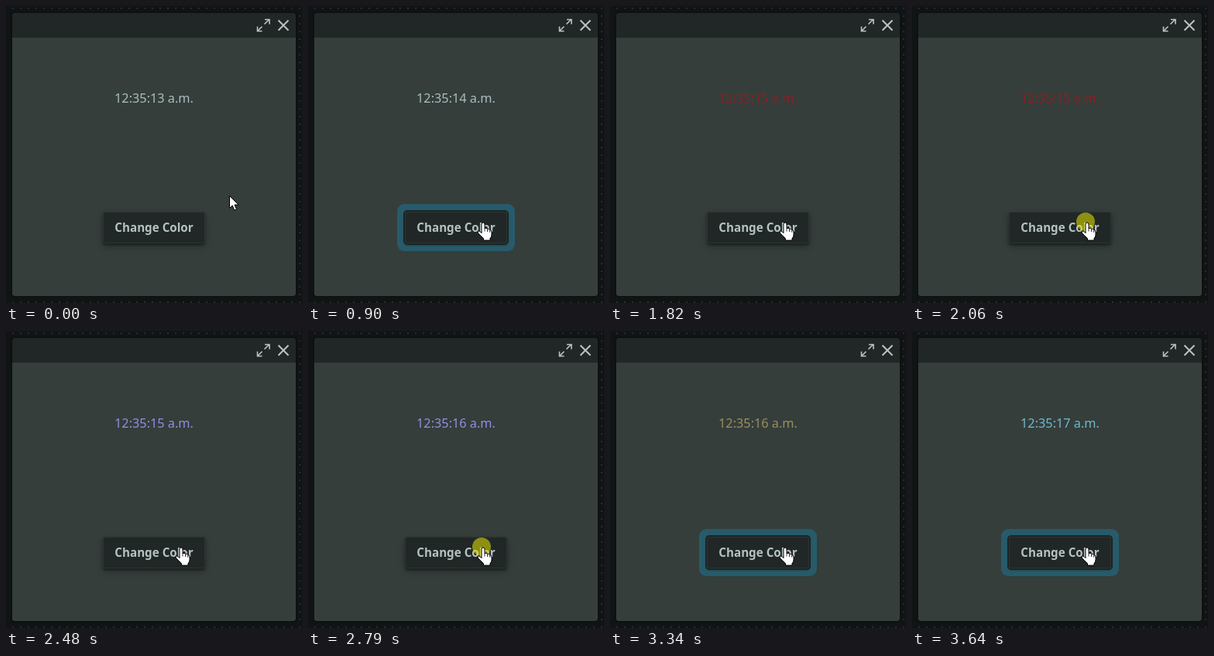
An HTML page that plays this animation: 382x384 px, repeating every 4010 ms.

```html
<!DOCTYPE html>
<html lang="en">
<head>
<meta charset="utf-8">
<title>Change Color</title>
<style>
  html, body { margin: 0; width: 100%; height: 100%; overflow: hidden; }
  body {
    position: relative;
    background: #101414 radial-gradient(circle, #272d2c 0.9px, transparent 1.3px) 4px -2px / 10px 10px;
    font-family: "Noto Sans", "Open Sans", sans-serif;
  }
  body > * { position: absolute; }
  #panel {
    left: 8px; top: 9px; width: 366px; height: 366px;
    border-radius: 4px;
    background: linear-gradient(#212726 32px, #353e3b 32px);
    box-shadow: 0 0 3px #0009;
  }
  #clock, #button { text-align: center; white-space: nowrap; }
  #clock { left: 8px; width: 366px; top: 108px; font-size: 16.3px; line-height: 22px; }
  #button {
    left: 125px; top: 266px; width: 132px; height: 41px;
    border-radius: 3px;
    background: #212726;
    color: #b5c2c2;
    font-size: 15.2px; font-weight: 700; line-height: 41px;
  }
  svg { left: 0; top: 0; }
</style>
</head>
<body>
<div id="panel"></div>
<div id="clock"></div>
<div id="button">Change Color</div>
<svg width="382" height="384" fill="none">
  <g stroke="#b9c3c2">
    <path stroke-width="1.6" d="M333.5 23.5 340 17M334 17.5h6v6M330.500 26.500 324 33M324.500 26.500v6h6"/>
    <path stroke-width="2" d="M351.500 18.500l13 13m0-13l-13 13"/>
  </g>
  <circle id="click" cx="224" cy="279" r="12" fill="#e8e800" fill-opacity=".55"/>
  <g id="pointer" fill="#fff" stroke="#000" stroke-linejoin="round">
    <path id="arrow" d="M-.5 .5v16l3.700-3.500 2.500 6 2.800-1.200-2.500-5.800h5.200z"/>
    <g id="hand">
      <path d="M0 3Q0 1 2 1T4 3V8.500Q6.500 7.500 7.500 9.300 10 8.500 10.700 10.500 13 10.500 13 13V17Q13 19.500 11 21.500V24H2.500V21.500Q-1 18.500-4.500 14.500-5.500 12.500-3.500 12-2 12 0 14.500Z"/>
      <path stroke-width=".8" d="M4 8.500v4M7.500 9.500v3.500M10.700 10.700v3"/>
    </g>
  </g>
</svg>
<script>
const LOOP = 4010, STEP = 60, HOVER = 720;
const START_COLOR = "#a9bdbe";
const ticks = [720, 1700, 2720, 3640];
const clicks = [
  [1280, "#9fc41f"], [1760, "#8c1f25"], [2060, "#4f9478"], [2420, "#918ee0"],
  [2790, "#2a5675"], [3090, "#98905e"], [3400, "#70b9cc"],
];

const el = id => document.getElementById(id);
const show = (id, visible) => el(id).style.display = visible ? "" : "none";
const clamp = x => Math.max(0, Math.min(1, x));
const lerp = (a, b, k) => a + (b - a) * k;

function draw(t) {
  const pressed = clicks.some(([at]) => t >= at && t < at + STEP);
  const released = clicks.filter(([at]) => t >= at + STEP).pop();

  el("clock").textContent = `12:35:${13 + ticks.filter(at => t >= at).length} a.m.`;
  el("clock").style.color = released ? released[1] : START_COLOR;

  // The focus ring grows in three steps after hovering or releasing.
  const ringStart = released ? released[0] + STEP : HOVER;
  const ring = pressed ? 0 : clamp(Math.floor((t - ringStart) / STEP) / 3);
  el("button").style.boxShadow = [
    "inset 0 0 0 1px #2d3533",
    `0 0 0 ${2 * ring}px #1c2425`,
    `0 2px 3px rgba(0,0,0,.4)`,
    `0 0 0 ${10 * ring}px rgba(39,91,106,${ring})`,
    "0 4px 8px rgba(0,0,0,.25)",
  ].join();

  // The pointer glides in with hard steps and eases to a stop.
  const glide = clamp((Math.floor((t - 600) / STEP) + 1) / 4);
  const eased = glide * glide * (3 - 2 * glide);
  const x = lerp(289, 224, eased), y = lerp(245, 279, eased);
  el("pointer").setAttribute("transform", `translate(${x} ${y})`);
  show("arrow", t < HOVER);
  show("hand", t >= HOVER);
  show("click", pressed);
}

function frame() {
  draw(performance.now() % LOOP);
  requestAnimationFrame(frame);
}
frame();
</script>
</body>
</html>
```
